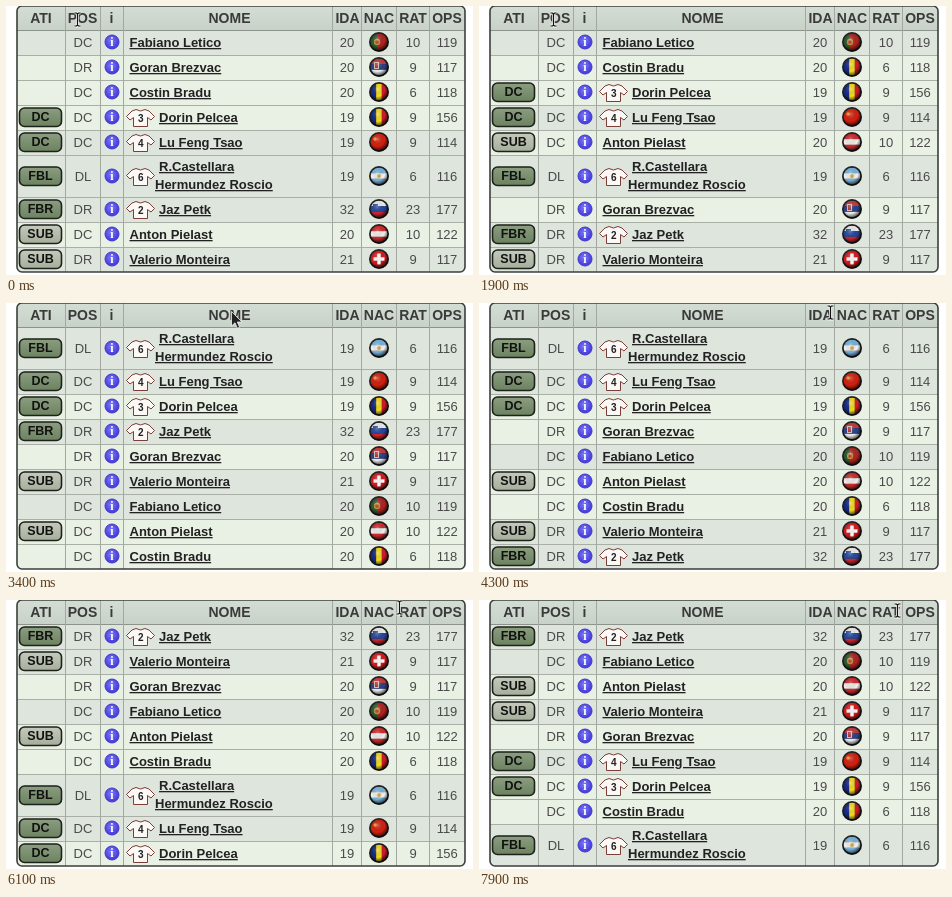
An HTML page for the animation above (8 s loop, 467 by 269 pixels).

```html
<!DOCTYPE html>
<html lang="en">
<head>
<meta charset="utf-8">
<title>Sortable squad table</title>
<style>
html, body { margin: 0; width: 100%; height: 100%; overflow: hidden; background: #fff; }
svg { display: block; width: 467px; height: 269px; }
text { font: 13px "Liberation Sans", Arial, sans-serif; fill: #4a4a4a; text-anchor: middle; }
.head { font-size: 14px; font-weight: bold; fill: #3a3a3a; }
.name { font-weight: bold; fill: #222; text-anchor: start; text-decoration: underline; text-decoration-skip-ink: none; }
.tag { font-size: 12.5px; font-weight: bold; fill: #111; }
.num { font-size: 10px; font-weight: bold; fill: #222; }
.info { font: bold 12px "Liberation Serif", serif; fill: #fff; }
</style>
</head>
<body>
<svg viewBox="0 0 467 269" xmlns="http://www.w3.org/2000/svg">
  <defs>
    <clipPath id="card"><rect x="11" width="448" height="266" rx="5"/></clipPath>
    <clipPath id="disc"><circle r="8.3"/></clipPath>
    <linearGradient id="headFill" x2="0" y2="1">
      <stop stop-color="#d4ddd3"/><stop offset="1" stop-color="#c9d2c8"/>
    </linearGradient>
    <linearGradient id="starter" x2="0" y2="1">
      <stop stop-color="#8b9e80"/><stop offset="1" stop-color="#6c8260"/>
    </linearGradient>
    <linearGradient id="bench" x2="0" y2="1">
      <stop stop-color="#c4cabc"/><stop offset="1" stop-color="#a5ae9b"/>
    </linearGradient>
    <radialGradient id="infoFill" cx=".45" cy=".4">
      <stop stop-color="#7c7cf8"/><stop offset="1" stop-color="#4a40dc"/>
    </radialGradient>
    <radialGradient id="gloss" cx=".42" cy=".35" r=".62">
      <stop stop-color="#fff" stop-opacity=".3"/>
      <stop offset=".6" stop-color="#000" stop-opacity="0"/>
      <stop offset="1" stop-color="#000" stop-opacity=".7"/>
    </radialGradient>
  </defs>
  <g clip-path="url(#card)">
    <rect x="11" width="448" height="266" fill="#e7eee3"/>
    <g id="rows"></g>
    <rect x="11" width="448" height="24" fill="url(#headFill)"/>
    <g id="grid"></g>
  </g>
  <rect x="11" width="448" height="266" rx="5" fill="none" stroke="#3c3f3c" stroke-width="1.6"/>
  <g id="heads"></g>
  <g id="beam" fill="none">
    <path transform="translate(.5 .5)" d="M-3-6.5H-1L0-5.5 1-6.5H3M0-5.5V5.5M-3 6.5H-1L0 5.5 1 6.5H3" stroke="#fff" stroke-width="3" opacity=".8"/>
    <path transform="translate(.5 .5)" d="M-3-6.5H-1L0-5.5 1-6.5H3M0-5.5V5.5M-3 6.5H-1L0 5.5 1 6.5H3" stroke="#111" stroke-width="1.2"/>
  </g>
  <path id="arrow" d="M.5.5V15L4 11.8 6.4 17.3 8.7 16.3 6.3 11H11Z" fill="#222" stroke="#f4f4f4" stroke-width=".8"/>
</svg>
<script>
const LOOP = 8000;
const $ = id => document.getElementById(id);

const rect = (x, y, w, h, fill, more = "") =>
  `<rect x="${x}" y="${y}" width="${w}" height="${h}" fill="${fill}" ${more}/>`;
const text = (x, y, str, cls = "") => `<text x="${x}" y="${y}" class="${cls}">${str}</text>`;

// Bands across (h) or down (v) a disc 17 px wide
const bands = (dir, ...fills) => fills.map((fill, i) => {
  const size = 17 / fills.length, at = -8.5 + i * size;
  return dir === "h" ? rect(-10, at, 20, size, fill) : rect(at, -10, size, 20, fill);
}).join("");

const flags = {
  pt: rect(-10, -10, 8, 20, "#2c5a2c") + rect(-2, -10, 12, 20, "#ae2420") +
      '<circle cx="-2" r="3.2" fill="#b99a3c"/><circle cx="-2" r="1.8" fill="#c33"/>',
  rs: bands("h", "#c23a3c", "#2b4288", "#eee") + rect(-5, -5, 5, 7, "#d9c8c0") + rect(-4, -4, 3, 5, "#b52a30"),
  ro: bands("v", "#162a86", "#f4dc1c", "#cf1c25"),
  cn: rect(-10, -10, 20, 20, "#d3200f") + '<circle cx="-4" cy="-3" r="1.7" fill="#eb9a20"/>',
  ar: bands("h", "#77b4de", "#f4f4f2", "#77b4de") + '<circle r="1.9" fill="#dca83a"/>',
  si: bands("h", "#eee", "#2348a2", "#cf2630") + rect(-6, -5, 5, 6, "#284f9f"),
  at: bands("h", "#cf2b2b", "#f3f0ed", "#cf2b2b"),
  ch: rect(-10, -10, 20, 20, "#d31c1c") + rect(-5.5, -1.7, 11, 3.4, "#fff") + rect(-1.7, -5.5, 3.4, 11, "#fff")
};

// tag, position, shirt, name, age, flag, rating, ops, shaded
const players = [
  ["", "DC", 0, "Fabiano Letico", 20, "pt", 10, 119, 1],
  ["", "DR", 0, "Goran Brezvac", 20, "rs", 9, 117, 0],
  ["", "DC", 0, "Costin Bradu", 20, "ro", 6, 118, 0],
  ["DC", "DC", 3, "Dorin Pelcea", 19, "ro", 9, 156, 0],
  ["DC", "DC", 4, "Lu Feng Tsao", 19, "cn", 9, 114, 1],
  ["FBL", "DL", 6, "R.Castellara|Hermundez Roscio", 19, "ar", 6, 116, 1],
  ["FBR", "DR", 2, "Jaz Petk", 32, "si", 23, 177, 1],
  ["SUB", "DC", 0, "Anton Pielast", 20, "at", 10, 122, 0],
  ["SUB", "DR", 0, "Valerio Monteira", 21, "ch", 9, 117, 1]
];

// Start time and the row order from then on
const orders = [
  [0, "012345678"],
  [500, "023475168"],
  [1100, "168502347"],
  [1900, "023475168"],
  [2900, "270816345"],
  [3400, "543618072"],
  [4300, "543107286"],
  [4900, "681072543"],
  [6900, "258143076"],
  [7500, "607814325"]
];

// Time, x, y, shape: b = text beam, a = arrow
const moves = [
  [0, 71, 13, "b"], [1900, 74, 13, "b"], [2000, 84, 11, "a"], [2100, 102, 9, "a"],
  [2200, 128, 6, "a"], [2300, 158, 5, "a"], [2400, 187, 7, "a"], [2500, 208, 9, "a"],
  [2600, 219, 11, "a"], [2800, 224, 9, "a"], [2900, 222, 12, "a"], [3100, 225, 8, "a"],
  [3600, 239, 13, "a"], [3700, 277, 17, "a"], [3800, 323, 12, "a"], [3900, 354, 6, "a"],
  [4200, 351, 9, "b"], [5400, 356, 9, "a"], [5500, 363, 9, "b"], [5600, 372, 10, "b"],
  [5700, 380, 9, "b"], [5800, 376, 8, "b"], [6000, 386, 8, "b"], [6100, 393, 7, "b"],
  [6200, 398, 8, "b"], [6300, 404, 9, "b"], [6400, 410, 9, "b"], [6500, 416, 8, "b"],
  [6600, 421, 3, "a"], [6700, 424, 2, "a"], [6900, 423, 1, "a"], [7900, 418, 10, "b"]
];

const height = p => p[3].includes("|") ? 42 : 25;

function badge(tag, c) {
  const fill = tag === "SUB" ? "bench" : "starter";
  return rect(13.5, c - 9, 42, 18.5, `url(#${fill})`, 'rx="5" stroke="#1c211a" stroke-width="1.6"') +
    text(34.5, c + 4, tag, "tag");
}

function shirt(n, c) {
  return `<path transform="translate(120 ${c - 8})" fill="#fbf8f5" stroke="#7b3d37" stroke-linejoin="round"
    d="M10 .5Q14.5 3.5 19 .5L23 2 28.5 7.5 25 11 21.5 8.5V17.5H7.5V8.5L4 11 .5 7.5 6 2Z"/>` +
    text(134.7, c + 5, n, "num");
}

function names(str, shirtNo, c) {
  const [first, second] = str.split("|");
  const x = shirtNo ? 153 : 123.5;
  if (!second) return text(x, c + 5, first, "name");
  return text(x, c - 5, first, "name") + text(149, c + 13, second, "name");
}

function row(p) {
  const [tag, pos, no, name, age, flag, rating, ops, shaded] = p;
  const h = height(p), c = h >> 1, y = c + 5;
  return "<g>" + rect(11, 0, 448, h, shaded ? "#dde5dd" : "#e9f0e4") +
    rect(11, 0, 448, 1, "#a9afa6") +
    (tag ? badge(tag, c) : "") +
    text(77, y, pos) +
    `<circle cx="106" cy="${c}" r="7" fill="url(#infoFill)" stroke="#4238c8"/>` +
    text(106, c + 4, "i", "info") +
    (no ? shirt(no, c) : "") + names(name, no, c) +
    text(341, y, age) +
    `<g transform="translate(373 ${c})"><circle r="10" fill="#222"/><g clip-path="url(#disc)">${flags[flag]}</g>` +
    '<circle r="9.5" fill="url(#gloss)"/></g>' +
    text(407, y, rating) + text(441, y, ops) + "</g>";
}

$("rows").innerHTML = players.map(row).join("");
const rowNodes = [...$("rows").children];

$("grid").innerHTML = rect(11, 24, 448, 1, "#8d928b") +
  [59, 94, 117, 326, 355, 390, 423].map(x => rect(x, 0, 1, 266, "#a2a8a0")).join("");
$("heads").innerHTML = [[35, "ATI"], [76.5, "POS"], [105.5, "i"], [223.5, "NOME"],
  [341.5, "IDA"], [373, "NAC"], [407, "RAT"], [441, "OPS"]]
  .map(([x, s]) => text(x, 17, s, "head")).join("");

const stepAt = (list, t) => list.findLast(s => s[0] <= t);

let shown = "";
function sortRows(order) {
  if (order === shown) return;
  shown = order;
  let y = 24;
  for (const i of order) {
    rowNodes[i].setAttribute("transform", `translate(0 ${y})`);
    y += height(players[i]);
  }
}

function draw() {
  const t = performance.now() % LOOP;
  sortRows(stepAt(orders, t)[1]);
  const [, x, y, shape] = stepAt(moves, t);
  const isBeam = shape === "b";
  $("beam").style.display = isBeam ? "" : "none";
  $("arrow").style.display = isBeam ? "none" : "";
  $(isBeam ? "beam" : "arrow").setAttribute("transform", `translate(${x} ${y})`);
  requestAnimationFrame(draw);
}
draw();
</script>
</body>
</html>
```
